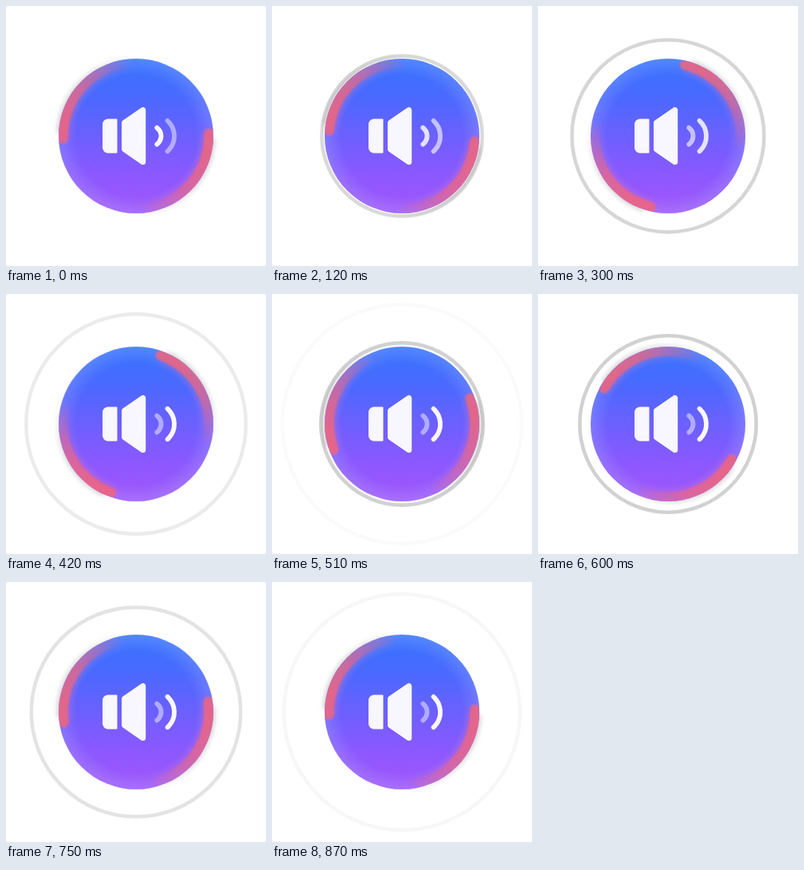
Animation, 326 px wide and 326 px high, one loop 900 ms. Source, as an HTML page with a canvas:

```html
<!DOCTYPE html>
<html lang="en">
<head>
<meta charset="utf-8">
<title>Sound button</title>
<style>
  html, body { margin: 0; width: 100%; height: 100%; overflow: hidden; background: #fff; }
  canvas { display: block; width: 326px; height: 326px; }
</style>
</head>
<body>
<canvas id="stage" width="326" height="326"></canvas>
<script>
const ctx = document.getElementById('stage').getContext('2d');
const TAU = Math.PI * 2;
const RAD = Math.PI / 180;
const LOOP = 900, STEP = 30, STEPS = LOOP / STEP;
const CENTER = 163, DISC = 97;
const ICON = '248,247,255';

const clamp = (v) => Math.max(0, Math.min(1, v));
const mix = (a, b, p) => a + (b - a) * p;

const discFill = ctx.createLinearGradient(0, -DISC, 0, DISC);
discFill.addColorStop(0, '#3874ff');
discFill.addColorStop(0.25, '#4a69ff');
discFill.addColorStop(0.5, '#6c60ff');
discFill.addColorStop(0.75, '#8b58ff');
discFill.addColorStop(1, '#a256fa');

const rimLight = ctx.createRadialGradient(0, 0, 76, 0, 0, DISC);
rimLight.addColorStop(0, 'rgba(190,215,255,0)');
rimLight.addColorStop(1, 'rgba(190,215,255,0.2)');

function circle(radius) {
  ctx.beginPath();
  ctx.arc(0, 0, radius, 0, TAU);
}

// A ring swells from the disc with a sine ease and fades out on the way.
function drawRing(age) {
  if (age <= 0 || age > 18.5) return;
  const outer = 133.5 - 35 * Math.cos(Math.PI * age / 25);
  const alpha = 0.26 * clamp((age - 1.5) / 3) * clamp((156.5 - outer) / 38);
  circle(outer - 2.25);
  ctx.lineWidth = 4.5;
  ctx.strokeStyle = `rgba(80,80,80,${alpha})`;
  ctx.stroke();
}

// Stroke that is solid at its head and fades out clockwise.
function cometArc(head, radius, width, rgb, alpha, blur) {
  const lead = 12, span = 88;
  const fade = ctx.createConicGradient((head - lead) * RAD, 0, 0);
  const stop = (deg, a) => fade.addColorStop(deg / 360, `rgba(${rgb},${a * alpha})`);
  stop(0, 1);
  stop(lead + 15, 1);
  stop(lead + 42, 0.78);
  stop(lead + 66, 0.38);
  stop(lead + span, 0);
  stop(360, 0);
  ctx.save();
  ctx.filter = `blur(${blur}px)`;
  ctx.lineCap = 'round';
  ctx.lineWidth = width;
  ctx.strokeStyle = fade;
  ctx.beginPath();
  ctx.arc(0, 0, radius, head * RAD, (head + span) * RAD);
  ctx.stroke();
  ctx.restore();
}

function drawDisc(heads) {
  heads.forEach((head) => cometArc(head + 6, 96, 8, '110,100,105', 0.25, 2.5));
  circle(DISC);
  ctx.fillStyle = discFill;
  ctx.fill();
  ctx.fillStyle = rimLight;
  ctx.fill();
  ctx.save();
  ctx.clip();
  heads.forEach((head) => {
    cometArc(head + 4, 91, 16, '225,100,165', 0.4, 4);
    cometArc(head, 91.5, 12.5, '244,100,118', 0.8, 1.2);
  });
  ctx.restore();
}

function drawWave(x, radius, halfAngle, alpha) {
  ctx.beginPath();
  ctx.arc(x, 0, radius, -halfAngle, halfAngle);
  ctx.lineWidth = 5.8;
  ctx.lineCap = 'round';
  ctx.strokeStyle = `rgba(${ICON},${alpha})`;
  ctx.stroke();
}

function drawSpeaker(progress) {
  ctx.fillStyle = ctx.strokeStyle = `rgb(${ICON})`;
  ctx.beginPath();
  ctx.roundRect(-42, -21.5, 18.5, 43, [7, 1, 1, 7]);
  ctx.fill();

  // The round joins soften the corners of the cone.
  ctx.lineJoin = 'round';
  ctx.lineWidth = 7;
  ctx.beginPath();
  ctx.moveTo(-14.5, -16.5);
  ctx.lineTo(8.7, -32.5);
  ctx.lineTo(8.7, 32.5);
  ctx.lineTo(-14.5, 16.5);
  ctx.closePath();
  ctx.fill();
  ctx.stroke();

  drawWave(18.5, 13, 0.93, mix(1, 0.5, progress));
  drawWave(22, 26, 0.83, mix(0.5, 1, progress));
}

function draw(step) {
  const turn = 178 - step * 1260 / (STEPS - 1);
  ctx.setTransform(1, 0, 0, 1, 0, 0);
  ctx.fillStyle = '#fff';
  ctx.fillRect(0, 0, 326, 326);
  ctx.translate(CENTER, CENTER);
  drawRing(step);
  drawRing(step - 12.5);
  drawDisc([turn, turn + 180]);
  drawSpeaker(clamp(step / 14));
}

const start = performance.now();
function tick() {
  const time = (performance.now() - start) % LOOP;
  draw(Math.floor(time / STEP));
  requestAnimationFrame(tick);
}
tick();
</script>
</body>
</html>
```
